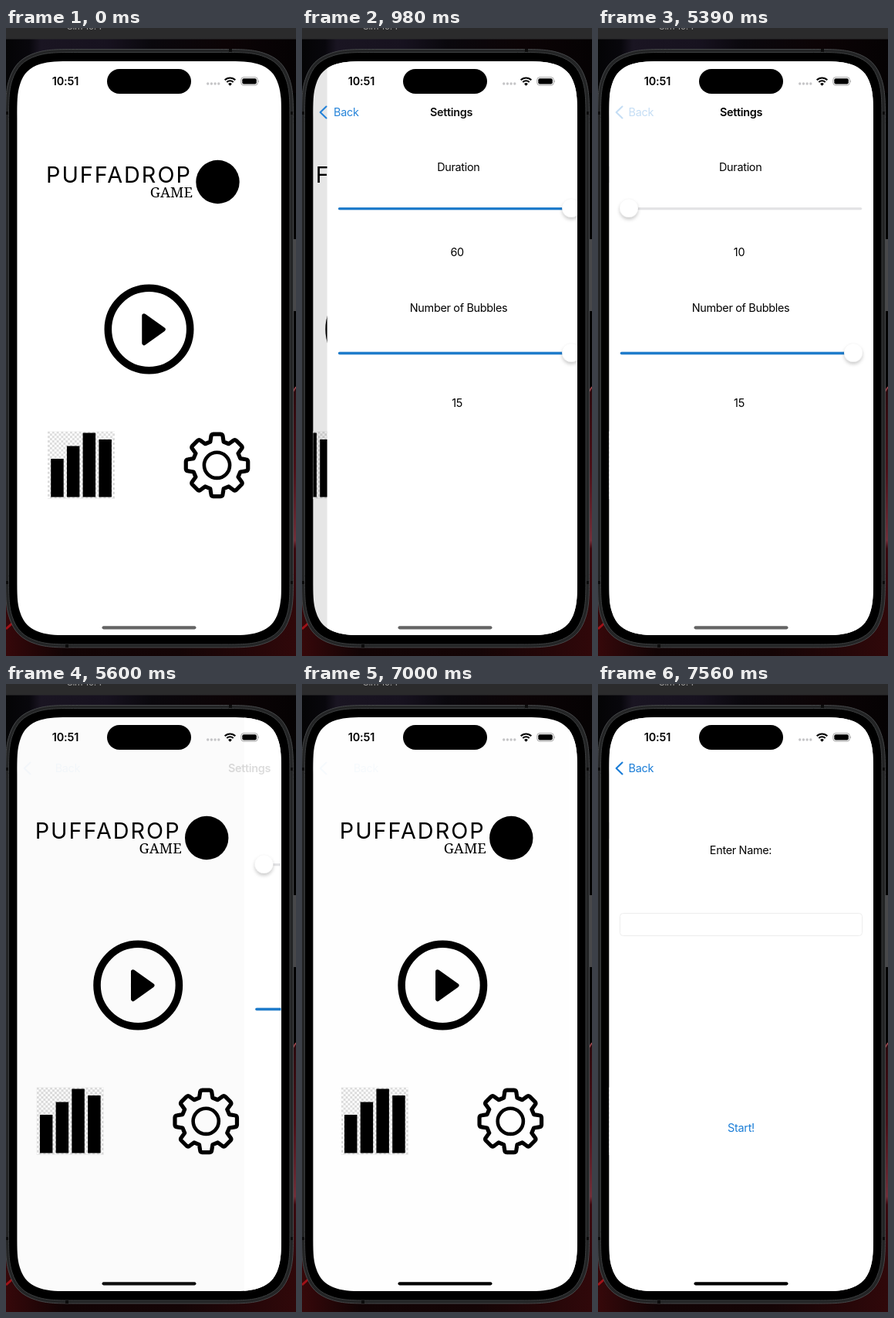
These frames come from a looping animation (376x812 px, 8000 ms). An HTML page:

```html
<!DOCTYPE html>
<html lang="en">
<head>
<meta charset="utf-8">
<title>Phone game menu</title>
<style>
  html, body { margin: 0; width: 100%; height: 100%; overflow: hidden; background: #000; }
  svg { display: block; width: 376px; height: 812px; }
  text { font: 400 14.4px Inter, sans-serif; letter-spacing: -.3px; }
  .mid { text-anchor: middle; }
  .bold { font-weight: 600; }
  .blue { fill: #1a7dd7; }
  .title { font: 400 28.8px Inter, sans-serif; letter-spacing: 2px; }
  .subtitle { font: 400 18.5px "Noto Serif", serif; letter-spacing: 0; text-anchor: end; }
  .line { fill: none; stroke: #000; stroke-linejoin: round; }
</style>
</head>
<body>
<svg viewBox="0 0 376 812">
  <defs>
    <clipPath id="screen"><path id="screenShape"/></clipPath>
    <pattern id="checker" x="54" y="521.5" width="5.8" height="5.8" patternUnits="userSpaceOnUse">
      <rect width="6" height="6" fill="#fff"/>
      <path d="M0 0h2.9v2.9h-2.9zM2.9 2.9h2.9v2.9h-2.9z" fill="#dcdcdc"/>
    </pattern>
    <linearGradient id="topGlow">
      <stop offset="0" stop-color="#040405"/><stop offset=".08" stop-color="#08070c"/>
      <stop offset=".12" stop-color="#1a1522"/><stop offset=".35" stop-color="#17121f"/>
      <stop offset=".5" stop-color="#0a080d"/><stop offset=".75" stop-color="#0c0406"/>
      <stop offset="1" stop-color="#050203"/>
    </linearGradient>
    <linearGradient id="sideGlow" x2="0" y2="1">
      <stop offset="0" stop-color="#2a0a0e"/><stop offset=".3" stop-color="#4a1018"/>
      <stop offset=".57" stop-color="#70303a"/><stop offset=".6" stop-color="#3a0a10"/>
      <stop offset="1" stop-color="#2a0608"/>
    </linearGradient>
    <linearGradient id="bottomGlow">
      <stop offset="0" stop-color="#36080a"/><stop offset=".2" stop-color="#120405"/>
      <stop offset=".6" stop-color="#140506"/><stop offset="1" stop-color="#30080a"/>
    </linearGradient>
    <filter id="shadow" x="-50%" y="-50%" width="200%" height="200%">
      <feDropShadow dx="0" dy="3" stdDeviation="2.2" flood-opacity=".2"/>
    </filter>
  </defs>

  <!-- desktop -->
  <rect width="376" height="812"/>
  <rect y="14" width="376" height="70" fill="url(#topGlow)"/>
  <rect width="376" height="14.5" fill="#2b2b2c"/>
  <text x="79" y="2" fill="#9a9a9a" style="font-size:12px">Sim 10.4</text>
  <rect x="366" y="465" width="10" height="347" fill="url(#sideGlow)"/>
  <rect x="366" y="273" width="10" height="93" fill="#48484a"/>
  <path d="M370 474L376 464" stroke="#9c4a50" stroke-width="1.5"/>
  <rect y="740" width="376" height="72" fill="url(#bottomGlow)"/>
  <path d="M0 777L10 768" stroke="#a01218" stroke-width="3"/>

  <!-- phone body -->
  <path id="frame" fill="#232425" stroke="#46484a"/>
  <path id="bezel" stroke="#3d3f40"/>
  <path d="M291 27v4M79 797v4M0 110h3M0 717h3M369 110h3M369 717h3" stroke="#0c0c0c" stroke-width="4"/>

  <g clip-path="url(#screen)">
    <rect x="14" y="43" width="343" height="742" fill="#fff"/>
    <g id="home">
      <text class="title" x="52" y="200">PUFFADROP</text>
      <text class="subtitle" x="242" y="219">GAME</text>
      <circle cx="274.5" cy="199" r="28.2"/>
      <circle class="line" cx="185.5" cy="389.5" r="53.2" stroke-width="9.6"/>
      <path d="M179 372L204 389.7L179 407.5Z" stroke="#000" stroke-width="5.5" stroke-linejoin="round"/>
      <rect x="54" y="521.5" width="87" height="87.5" fill="url(#checker)"/>
      <path d="M58.2 557h16.5v49.5h-16.5zM78.9 540.5h16.5v66h-16.5zM99.6 523.5h16.5v83h-16.5zM120.4 532h16.5v74.5h-16.5z"/>
      <path id="gear" class="line" stroke-width="5.2"/>
      <circle class="line" cx="273.5" cy="565.3" r="16.6" stroke-width="4.6"/>
    </g>
    <rect id="dim" x="14" y="43" width="343" height="742"/>

    <g id="settings">
      <rect x="14.5" y="43" width="343" height="742" fill="#fff"/>
      <text class="mid" x="184.7" y="185">Duration</text>
      <g id="durationSlider"></g>
      <text id="durationValue" class="mid" x="183" y="295"></text>
      <text class="mid" x="185" y="366.7">Number of Bubbles</text>
      <g id="bubbleSlider"></g>
      <text class="mid" x="183" y="490.3">15</text>
    </g>

    <g id="player">
      <rect x="14.5" y="43" width="343" height="742" fill="#fff"/>
      <text class="mid" x="185" y="220">Enter Name:</text>
      <rect x="28.5" y="296.5" width="314" height="29" rx="4" fill="#fff" stroke="#ededed"/>
      <text class="mid blue" x="185.5" y="579.3">Start!</text>
    </g>

    <g id="back">
      <path d="M31.5 101.5L23.7 109L31.5 116.5" fill="none" stroke="#1a7dd7" stroke-width="2.1" stroke-linecap="round" stroke-linejoin="round"/>
      <text id="backLabel" class="blue" x="39.6" y="114.2">Back</text>
    </g>
    <text id="heading" class="mid bold" x="185.5" y="114.2">Settings</text>

    <!-- status bar -->
    <text class="mid bold" x="77" y="74" style="letter-spacing:-.1px">10:51</text>
    <rect x="131" y="53" width="109" height="32" rx="16"/>
    <path d="M261.7 72h.01M266.4 72h.01M271.1 72h.01M275.8 72h.01" stroke="#c5c5c7" stroke-width="3.4" stroke-linecap="round"/>
    <path class="line" d="M283.7 67.3a9.6 9.6 0 0 1 13.6 0M286.3 70a5.9 5.9 0 0 1 8.4 0" stroke-width="2.1"/>
    <path d="M288.1 72.2a3.5 3.5 0 0 1 4.8 0l-2.4 2.5z"/>
    <rect x="304.8" y="63.7" width="21.5" height="10.3" rx="3.2" fill="#fff" stroke="#999" stroke-width=".9"/>
    <rect x="306.3" y="65.2" width="18.5" height="7.3" rx="2"/>
    <path d="M327.4 67.2q1.7 1.6 0 3.4z" fill="#999"/>
    <rect id="indicator" x="124.5" y="773.2" width="122" height="4.2" rx="2.1"/>
  </g>
</svg>
<script>
const LOOP = 8000, STEP = 70, PAGE_WIDTH = 342;
const SETTINGS_OPEN = 724, BACK_TAP = 5390, SETTINGS_CLOSE = 5410, PLAYER_OPEN = 6985;
const el = id => document.getElementById(id);
const shift = (id, x) => el(id).setAttribute('transform', `translate(${x.toFixed(2)} 0)`);
const fade = (id, alpha) => el(id).setAttribute('opacity', alpha.toFixed(3));

// Critically damped spring from 0 to 1
function spring(t, start) {
  const w = Math.max(0, t - start) * 0.01826;
  return w > 9.3 ? 1 : 1 - (1 + w) * Math.exp(-w);
}

// Rectangle with continuous-curvature corners
function squircle(left, top, right, bottom, r) {
  const curve = [[0, 1.528], [0, 1.088], [0, .868], [.075, .631], [.17, .33],
    [.33, .17], [.631, .075], [.868, 0], [1.088, 0], [1.528, 0]];
  const corner = (x, y, sx, sy, reversed) => {
    const points = curve.map(([u, v]) => `${x + sx * u * r} ${y + sy * v * r}`);
    if (reversed) points.reverse();
    return `${points[0]}C${points.slice(1).join(' ')}`;
  };
  return `M${corner(left, top, 1, 1)}L${corner(right, top, -1, 1, true)}` +
    `L${corner(right, bottom, -1, -1)}L${corner(left, bottom, 1, -1, true)}Z`;
}

function gearPath() {
  const at = (r, degrees) => {
    const a = degrees * Math.PI / 180;
    return `${273.5 + r * Math.sin(a)} ${565.3 - r * Math.cos(a)}`;
  };
  let d = '';
  for (let a = 0; a < 360; a += 45) {
    d += `${a ? 'L' : 'M'}${at(31.5, a - 16)}L${at(38, a - 11.5)}Q${at(40.8, a - 10.5)} ${at(40.5, a - 6.5)}` +
      `L${at(40.5, a + 6.5)}Q${at(40.8, a + 10.5)} ${at(38, a + 11.5)}L${at(31.5, a + 16)}`;
  }
  return d + 'Z';
}

function drawSlider(id, y, amount) {
  const x = 40 + 291 * amount;
  const track = (end, color) =>
    `<path d="M30.5 ${y}H${end}" stroke="${color}" stroke-width="3.4" stroke-linecap="round"/>`;
  el(id).innerHTML = track(340.5, '#e3e3e5') + (amount ? track(x, '#1f7ccb') : '') +
    `<circle cx="${x}" cy="${y - .8}" r="12" fill="#fff" stroke="#000" stroke-opacity=".05" stroke-width=".6" filter="url(#shadow)"/>`;
}

let shownDuration;
function setDuration(value) {
  if (value === shownDuration) return;
  shownDuration = value;
  drawSlider('durationSlider', 233.6, (value - 10) / 50);
  el('durationValue').textContent = value;
}

function draw(t) {
  const settings = spring(t, SETTINGS_OPEN) - spring(t, SETTINGS_CLOSE);
  const player = spring(t, PLAYER_OPEN);
  const open = Math.max(settings, player);

  shift('home', -0.3 * PAGE_WIDTH * open);
  fade('dim', 0.105 * open);
  shift('settings', PAGE_WIDTH * (1 - settings));
  shift('player', PAGE_WIDTH * (1 - player));

  shift('heading', 151 * (1 - settings));
  fade('heading', settings);
  shift('backLabel', 28 * (1 - open));
  fade('back', open * (t >= BACK_TAP && t < PLAYER_OPEN ? 0.25 : 1));

  setDuration(t < 2240 ? 60 : t < 2310 ? 35 : 10);
  const gray = Math.round(100 * (1 - spring(t, SETTINGS_CLOSE)));
  el('indicator').setAttribute('fill', `rgb(${gray},${gray},${gray})`);
}

el('screenShape').setAttribute('d', squircle(14.4, 43, 356.8, 785, 48));
el('frame').setAttribute('d', squircle(-.5, 27.5, 372.5, 801, 62));
el('bezel').setAttribute('d', squircle(3.5, 31.5, 368, 797, 58));
el('gear').setAttribute('d', gearPath());
drawSlider('bubbleSlider', 420.5, 1);

const began = performance.now();
function tick() {
  const t = (performance.now() - began) % LOOP;
  draw(Math.floor(t / STEP) * STEP);
  requestAnimationFrame(tick);
}
tick();
</script>
</body>
</html>
```
